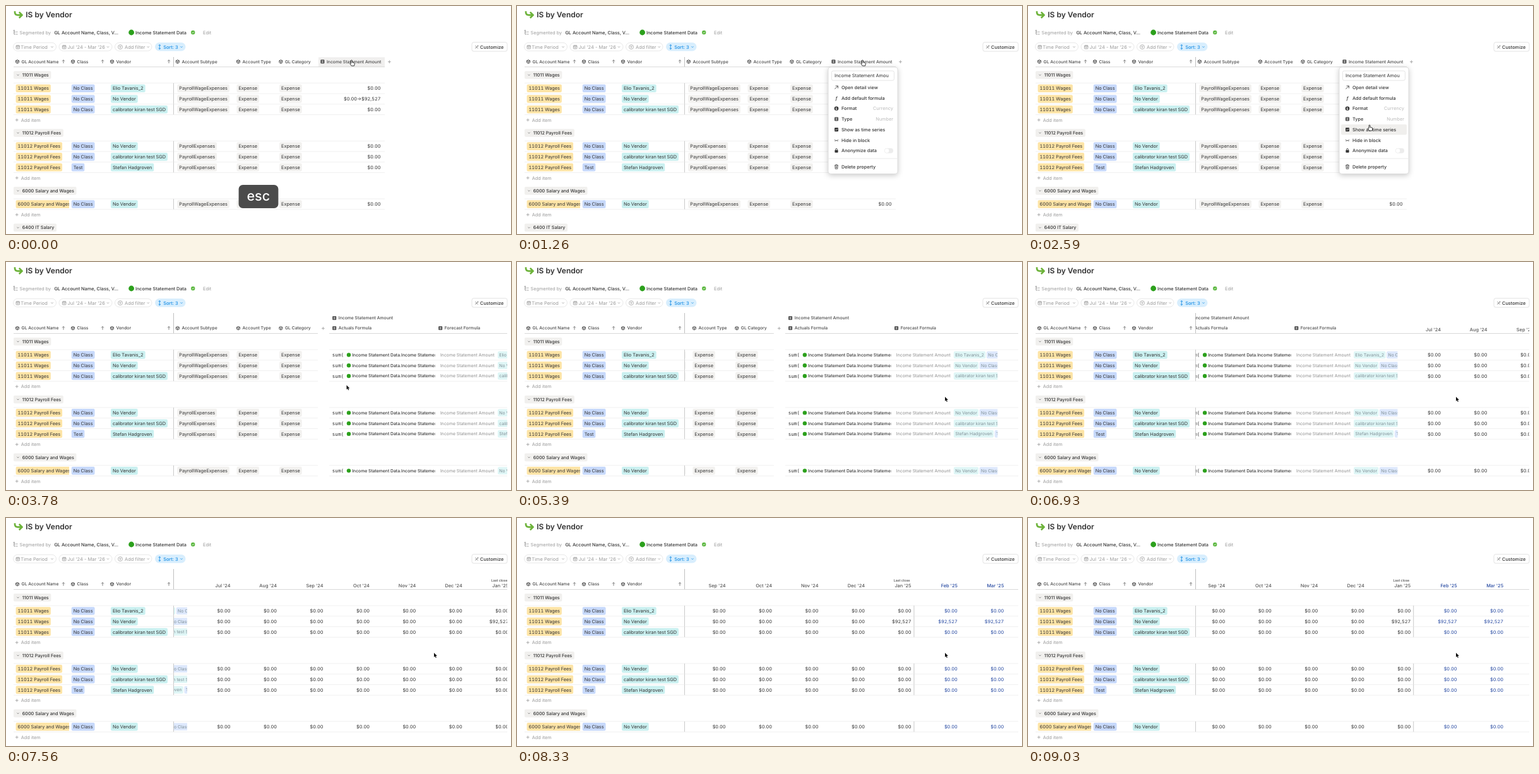
Recreate the animation shown at these times as an HTML page. Size 800 by 362 pixels, loop 9100 ms.

```html
<!DOCTYPE html>
<html lang="en">
<head>
<meta charset="utf-8">
<title>IS by Vendor</title>
<style>
  html, body { margin: 0; width: 100%; height: 100%; overflow: hidden; background: #fff; }
  svg { display: block; width: 100vw; height: 100vh; }
  text { font-family: Inter, "Noto Sans", sans-serif; text-rendering: geometricPrecision; white-space: pre; }
  .mono { font-family: "DejaVu Sans Mono", "Noto Sans Mono", monospace; }
  .cell { font-variant-numeric: tabular-nums; }
</style>
</head>
<body>
<svg id="stage" viewBox="0 0 800 362"></svg>
<script>
const LOOP = 9100, STEP = 70;
const INK = '#333', HEAD = '#484848', GREY = '#9b9b9b', RULE = '#ececec', BLUE = '#2447a0';
const YELLOW = '#fde4a6', SKY = '#c7d9fb', TEAL = '#caf0f0', STONE = '#f2f1ef', GREEN = '#2ca01c';
const TOP = 96.7, PITCH = 16.75, GROW = 16.75;

const stage = document.getElementById('stage');

function add(parent, tag, attrs = {}) {
  const node = document.createElementNS('http://www.w3.org/2000/svg', tag);
  for (const key in attrs) node.setAttribute(key, attrs[key]);
  return parent.appendChild(node);
}
const group = (parent, attrs) => add(parent, 'g', attrs);
const rect = (parent, x, y, width, height, rx, fill, more) =>
  add(parent, 'rect', { x, y, width, height, rx, fill, ...more });
const dot = (parent, cx, cy, r, fill) => add(parent, 'circle', { cx, cy, r, fill });
const stroke = (parent, d, color, width = 0.8, more) =>
  add(parent, 'path', { d, fill: 'none', stroke: color, 'stroke-width': width, ...more });

// y is the middle of the capitals
function label(parent, x, y, string, { size = 7.35, fill = INK, weight = 400, anchor = 'start', cls = '' } = {}) {
  const node = add(parent, 'text', {
    x, y: y + size * 0.36, 'font-size': size, fill, 'font-weight': weight, 'text-anchor': anchor, class: cls
  });
  node.textContent = string;
  return node;
}

// returns the right edge
function pill(parent, x, y, string, fill, { size = 7.35, pad = 2.9, height = 12.6, color = INK } = {}) {
  const box = rect(parent, x, y - height / 2, 0, height, 2, fill);
  const node = label(parent, x + pad, y, string, { size, fill: color, cls: 'cell' });
  const width = node.getComputedTextLength() + 2 * pad;
  box.setAttribute('width', width);
  return x + width;
}

const defs = add(stage, 'defs');
let clips = 0;
function clipped(parent, x, y, width, height) {
  const id = 'clip' + clips++;
  rect(add(defs, 'clipPath', { id }), x, y, width, height, 0, '#000');
  return group(parent, { 'clip-path': `url(#${id})` });
}

// icons, centred on x, y
const chevron = (p, x, y, color) => stroke(p, `M${x - 1.6} ${y - 0.8}l1.6 1.6 1.6-1.6`, color, 0.8);
const plus = (p, x, y, color) => stroke(p, `M${x - 2.4} ${y}h4.8M${x} ${y - 2.4}v4.8`, color, 0.8);
const upArrow = (p, x, y) => stroke(p, `M${x} ${y + 2.6}v-5.2M${x - 1.9} ${y - 0.7}l1.9-1.9 1.9 1.9`, '#555', 0.75);
const cube = (p, x, y) =>
  stroke(p, `M${x} ${y - 2.8}l2.5 1.3v3l-2.5 1.3-2.5-1.3v-3zM${x - 2.5} ${y - 1.5}l2.5 1.3 2.5-1.3M${x} ${y - 0.2}v3`, HEAD, 0.95);
function grid(p, x, y) {
  rect(p, x - 3, y - 3, 6, 6, 1.1, '#444');
  stroke(p, `M${x - 1.8} ${y - 1.2}h3.6M${x - 1.8} ${y + 1.2}h3.6M${x} ${y - 1.8}v3.6`, '#fff', 0.6);
}
function calendar(p, x, y) {
  rect(p, x - 2.8, y - 2.3, 5.6, 5.2, 0.8, 'none', { stroke: GREY, 'stroke-width': 0.8 });
  stroke(p, `M${x - 2.8} ${y - 0.9}h5.6M${x - 1.3} ${y - 3.2}v1.5M${x + 1.3} ${y - 3.2}v1.5M${x - 1.5} ${y + 1}h3`, GREY, 0.9);
}

function heading(parent, x, y, string, icon = cube) {
  icon(parent, x, y);
  label(parent, x + 6.6, y, string, { size: 6.8, weight: 500, fill: HEAD });
}

function buildTop() {
  stroke(stage, 'M14 8.2v1.6q0 4.6 4.6 4.6h6M20.8 9.8l4.8 4.6-4.8 4.6', '#6db33a', 2.7, { 'stroke-linejoin': 'round' });
  label(stage, 31.3, 14, 'IS by Vendor', { size: 12, weight: 600 });

  stroke(stage, 'M12.8 38.4v6.4h2.4M12.8 41.2h2.4M16 41.2h2.4M16 44.8h2.4M11.6 38.6h2.4', GREY, 1);
  label(stage, 21.6, 42, 'Segmented by', { size: 7.25, fill: GREY });
  label(stage, 76.4, 42, 'GL Account Name, Class, V...', { size: 7.3, weight: 500 });
  dot(stage, 198.6, 42, 4.4, GREEN);
  label(stage, 205, 42, 'Income Statement Data', { size: 7.25, weight: 500 });
  dot(stage, 296.2, 42, 3.2, '#5fb944');
  stroke(stage, 'M294.8 42.1l1 1 1.8-2', '#fff', 0.8);
  label(stage, 312, 42, 'Edit', { fill: GREY });

  const filter = (x, width, textX, string, arrowX) => {
    rect(stage, x, 58.3, width, 13, 6.5, '#fff', { stroke: '#dedede', 'stroke-width': 0.7 });
    label(stage, textX, 65, string, { size: 7.5, fill: GREY });
    chevron(stage, arrowX, 65, GREY);
  };
  filter(11.5, 68, 23.2, 'Time Period', 73);
  calendar(stage, 18.8, 65);
  filter(84, 84, 97.6, "Jul '24 - Mar '26", 161.5);
  calendar(stage, 92.2, 65);
  filter(172.5, 58.5, 188, 'Add filter', 225.2);
  add(stage, 'circle', { cx: 181, cy: 65, r: 3.5, fill: 'none', stroke: GREY, 'stroke-width': 0.7 });
  stroke(stage, 'M179.2 64h3.6M179.9 65.3h2.2M180.5 66.6h1', GREY, 0.7);

  rect(stage, 236, 58, 48.5, 13.6, 6.8, '#d8eefd');
  stroke(stage, 'M243.3 61.5v7M241.6 63l1.7-1.7 1.7 1.7M241.6 67l1.7 1.7 1.7-1.7', '#1b8fe6', 0.9);
  label(stage, 249.2, 65, 'Sort: 3', { weight: 500, fill: '#1b8fe6' });
  chevron(stage, 278, 65, '#1b8fe6');

  rect(stage, 738, 57.6, 56, 14.4, 3, '#fff', { stroke: '#dcdcdc', 'stroke-width': 0.8 });
  stroke(stage, 'M743.6 67.2l4-4M743.6 63.2l1.2 1.2M746.4 66l1.2 1.2M747.2 62.4l1 1', '#444', 0.9);
  label(stage, 751, 65, 'Customize', { weight: 500 });
}

const NEW = 'Elio Tavanis_2', TRIAL = 'calibrator kiran test SGD', HAND = 'Stefan Hadgroven', NONE = 'No Vendor';
const ledger = [
  { name: '11011 Wages', sub: 'PayrollWageExpenses', rows: [['No Class', NEW], ['No Class', NONE], ['No Class', TRIAL]] },
  { name: '11012 Payroll Fees', sub: 'PayrollExpenses', rows: [['No Class', NONE], ['No Class', TRIAL], ['Test', HAND]] },
  { name: '6000 Salary and Wages', sub: 'PayrollWageExpenses', rows: [['No Class', NONE]] },
  { name: '6400 IT Salary', rows: [] }
];
const monthNames = 'Jul Aug Sep Oct Nov Dec Jan Feb Mar Apr May Jun'.split(' ');
const months = Array.from({ length: 21 }, (_, i) => ({
  name: `${monthNames[i % 12]} '${24 + Math.floor((i + 6) / 12)}`,
  x: 917 + 73.45 * i,
  fill: i > 6 ? BLUE : INK
}));
const CLOSE = 6;

buildTop();

const pinned = group(stage);
const wide = group(clipped(stage, 266, 78, 528, 284));
const plain = group(wide), series = group(wide);
const glColumn = clipped(pinned, 10, 90, 90, 300);
const actuals = clipped(series, 512, 90, 167.6, 300);
const forecast = clipped(series, 681, 90, 167.4, 300);
const divider = stroke(stage, '', '#b9b9b9', 0.9);
const hover = rect(plain, 495, 81.4, 105, 15, 0, '#f0efee');

function rules(y, color) {
  stroke(pinned, `M12 ${y}H265.5`, color, 0.8);
  stroke(wide, `M265.5 ${y}H494`, color, 0.8);
  stroke(plain, `M494 ${y}H600`, color, 0.8);
  stroke(series, `M512 ${y}H2400`, color, 0.8);
}

function buildHeader() {
  rules(TOP, '#cfcfcf');
  [[18, 'GL Account Name', 91], [106, 'Class', 153], [168, 'Vendor', 258]].forEach(([x, name, arrow]) => {
    heading(pinned, x, 88.3, name);
    upArrow(pinned, arrow, 88.3);
  });
  [[271.8, 'Account Subtype'], [368, 'Account Type'], [435.4, 'GL Category']]
    .forEach(([x, name]) => heading(wide, x, 88.3, name));
  heading(plain, 501.4, 88.3, 'Income Statement Amount', grid);
  plus(plain, 607.4, 88.6, '#999');

  plus(series, 502.4, 88.6, '#999');
  heading(series, 520.2, 72.3, 'Income Statement Amount', grid);
  heading(series, 520.2, 88.3, 'Actuals Formula', grid);
  heading(series, 688.2, 88.3, 'Forecast Formula', grid);
  months.forEach(m => label(series, m.x, 90.3, m.name, { weight: 500, fill: m.fill === INK ? '#555' : BLUE, anchor: 'end' }));
  label(series, months[CLOSE].x - 2, 82.3, 'Last close', { size: 5.3, weight: 500, fill: '#444', anchor: 'end' });
}

function buildRow(y, { name, sub }, [cls, vendor], active) {
  const end = { anchor: 'end', cls: 'cell' };
  pill(glColumn, 15.6, y, name, YELLOW);
  pill(pinned, 103.8, y, cls, SKY);
  pill(pinned, 166, y, vendor, TEAL);
  pill(wide, 271.3, y, sub, STONE);
  pill(wide, 365.5, y, 'Expense', STONE);
  pill(wide, 433.2, y, 'Expense', STONE);
  label(plain, 593.5, y, active ? '$0.00→$92,527' : '$0.00', end);

  label(actuals, 516.8, y, 'sum(', { size: 7.6, cls: 'mono' });
  dot(actuals, 543, y, 3.2, GREEN);
  label(actuals, 548.2, y, 'Income Statement Data.Income Statement', { size: 6.8, weight: 500 });
  label(forecast, 688, y, 'Income Statement Amount', { size: 6.85, fill: '#8b8b8b' });
  const small = { size: 6.9, pad: 2.3, height: 11.6, color: '#7f8f96' };
  const next = pill(forecast, 779, y, vendor, '#dff6f6', small);
  pill(forecast, next + 1.6, y, cls, '#dde8fc', small);

  months.forEach((m, i) =>
    label(series, m.x, y, active && i >= CLOSE ? '$92,527' : '$0.00', { ...end, fill: m.fill }));
  const half = PITCH / 2;
  stroke(pinned, `M265.5 ${y - half}v${PITCH}`, '#c4c4c4', 0.9);
  stroke(series, `M${months[CLOSE].x + 4.5} ${y - half}v${PITCH}`, '#c4c4c4', 0.9);
  rules(y + half, RULE);
}

function buildBody() {
  let y = 109.5;
  ledger.forEach((section, s) => {
    const box = rect(pinned, 12, y - 6.3, 0, 12.6, 2, '#f1f0ee');
    const title = label(pinned, 25.8, y, section.name, { size: 7.2, weight: 500 });
    box.setAttribute('width', title.getComputedTextLength() + 17.4);
    chevron(pinned, 19, y, '#777');
    if (!section.rows.length) return;
    y += 21.2;
    rules(y - PITCH / 2, RULE);
    section.rows.forEach((row, r) => {
      buildRow(y, section, row, s === 0 && r === 1);
      y += PITCH;
    });
    plus(pinned, 17.2, y, GREY);
    label(pinned, 23.8, y, 'Add item', { fill: GREY });
    y += 20.5;
  });
}

const items = [
  [129.3, 'Open detail view'], [146, 'Add default formula'], [162.7, 'Format', 'Currency'],
  [179.5, 'Type', 'Number'], [196.3, 'Show as time series'], [213, 'Hide in block'],
  [229.8, 'Anonymize data'], [255.5, 'Delete property']
];
const menu = group(stage);
let hoverBar;

function buildMenu() {
  const sheet = rect(menu, 493, 97, 110, 169.5, 4, '#fff', { stroke: '#dadada', 'stroke-width': 0.8 });
  sheet.style.filter = 'drop-shadow(0 2px 4px rgba(0,0,0,.22))';
  rect(menu, 498.4, 103, 99, 15.2, 2.5, '#fff', { stroke: '#dfdfdf', 'stroke-width': 0.8 });
  label(clipped(menu, 500, 103, 90, 15), 503, 110.6, 'Income Statement Amou', { size: 7.4 });
  hoverBar = rect(menu, 496, 0, 104, 16.6, 2, '#f0efed');
  items.forEach(([y, name, hint]) => {
    label(menu, 514, y, name, { size: 7.25, weight: 500 });
    if (hint) label(menu, 596, y, hint, { fill: '#bcbcbc', anchor: 'end' });
  });
  stroke(menu, 'M503.4 131.9l5-5M504.6 126.9h3.8v3.8', INK, 0.8);
  label(menu, 506, 146, 'ƒ', { weight: 500, anchor: 'middle' }).setAttribute('font-style', 'italic');
  dot(menu, 506, 162.7, 3.3, INK);
  label(menu, 506, 162.7, '$', { size: 5, fill: '#fff', weight: 600, anchor: 'middle' });
  grid(menu, 506, 179.5);
  rect(menu, 503, 193.3, 6, 6, 1, INK);
  stroke(menu, 'M504 197.6l1.3-1.6 1.2 1 1.6-2', '#fff', 0.7);
  stroke(menu, 'M503 212.2q3 3.2 6 0M504.3 214l-.7 1M507.7 214l.7 1', INK, 0.8);
  rect(menu, 503.4, 228.8, 5.2, 4, 0.8, INK);
  stroke(menu, 'M504.6 229v-1.2a1.4 1.4 0 0 1 2.8 0v1.2', INK, 0.8);
  rect(menu, 582, 225.8, 14, 8, 4, '#ececec');
  dot(menu, 586, 229.8, 3.2, '#fff');
  stroke(menu, 'M493.5 242.2h109', '#e6e6e6', 0.8);
  stroke(menu, 'M503 253h6M504.8 253v-1h2.4v1M503.8 253l.4 5.6h3.6l.4-5.6M505.3 254.6v2.6M506.7 254.6v2.6', INK, 0.75);
}

buildHeader();
buildBody();
buildMenu();

const key = group(stage);
rect(key, 368.6, 284, 62.8, 37, 6.5, '#4b4b4b');
add(key, 'text', { x: 399.8, y: 309.4, 'font-size': 21.5, 'font-weight': 500, fill: '#fff', 'text-anchor': 'middle' }).textContent = 'esc';

const pointer = group(stage);
const outline = { 'stroke-linejoin': 'round' };
const hand = add(pointer, 'path', {
  d: 'M-.9.8a.9.9 0 0 1 1.8 0V3.5L4 4.2Q5.1 4.5 4.8 5.7L4.1 9H-.2L-2.7 5.6Q-2.6 4.2-.9 5.2Z',
  fill: '#fff', stroke: '#222', 'stroke-width': 0.9, ...outline
});
const arrow = add(pointer, 'path', {
  d: 'M0 0V7L1.6 5.5 2.7 8 3.9 7.5 2.8 5.1H5Z',
  fill: '#111', stroke: '#fff', 'stroke-width': 0.9, 'paint-order': 'stroke', ...outline
});

const clamp = v => Math.min(1, Math.max(0, v));
const span = (t, from, to) => clamp((t - from) / (to - from));
const smooth = p => p * p * (3 - 2 * p);
const easeOut = (p, power) => 1 - (1 - p) ** power;

const moves = [[1890, 2520, 541, 189], [3080, 3360, 539.5, 195.5], [4130, 4410, 678, 214]];
function pointerAt(t) {
  let x = 547.5, y = 86;
  for (const [from, to, toX, toY] of moves) {
    const p = smooth(span(t, from, to));
    x += (toX - x) * p;
    y += (toY - y) * p;
  }
  return [x, y];
}
const scrollAt = t => 263 * easeOut(span(t, 5040, 6960), 2) + 488.5 * easeOut(span(t, 7035, 8980), 3);

const show = (node, on) => node.setAttribute('display', on ? 'inline' : 'none');

function render(time) {
  const t = Math.floor((time % LOOP) / STEP) * STEP;
  const asSeries = t >= 3360;
  const shift = asSeries ? GROW : 0;
  const [x, y] = pointerAt(t);

  pinned.setAttribute('transform', `translate(0 ${shift})`);
  wide.setAttribute('transform', `translate(${-scrollAt(t)} ${shift})`);
  divider.setAttribute('d', `M265.5 81V${TOP + shift}`);
  show(plain, !asSeries);
  show(series, asSeries);
  show(hover, t < 840);

  menu.setAttribute('opacity', span(t, 770, 1050) * (1 - span(t, 3080, 3290)));
  const over = items.find(([mid]) => Math.abs(y - mid) <= 8.4);
  show(hoverBar, over);
  if (over) hoverBar.setAttribute('y', over[0] - 8.3);

  key.setAttribute('opacity', 1 - span(t, 0, 350));
  pointer.setAttribute('transform', `translate(${x} ${y})`);
  show(hand, !asSeries);
  show(arrow, asSeries);
}

const start = performance.now();
function tick() {
  render(performance.now() - start);
  requestAnimationFrame(tick);
}
tick();
</script>
</body>
</html>
```
